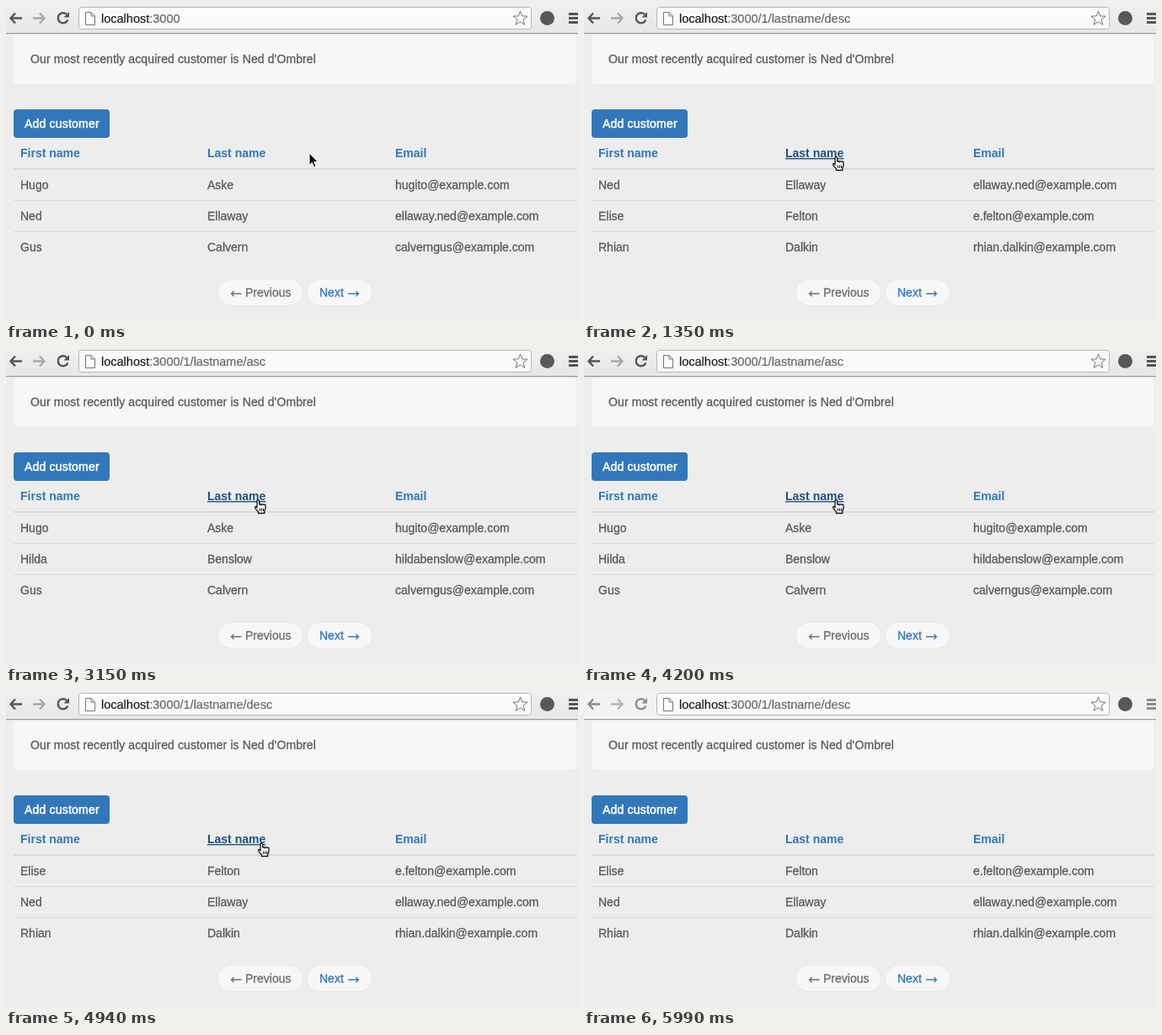
Animation, 679 px wide and 375 px high, one loop 6090 ms. Source, as an HTML page:

```html
<!DOCTYPE html>
<html lang="en">
<head>
<meta charset="utf-8">
<title>Customers</title>
<style>
  html, body { margin: 0; width: 100%; height: 100%; overflow: hidden; background: #ededed; }
  svg { display: block; }
  text {
    font: 14px "Liberation Sans", Arial, sans-serif;
    fill: #5a5a5a; stroke: #5a5a5a; stroke-width: .3px;
  }
  .link { fill: #3277b9; stroke: #3277b9; }
  .head { font-weight: bold; stroke: none; }
  .hover { fill: #23527c; text-decoration: underline 1px; text-underline-offset: 1px; }
  .url { font-size: 14.5px; fill: #666; stroke: #666; stroke-width: .2px; }
  .url .host { fill: #1c1c1c; stroke: #1c1c1c; }
  .add { fill: #fff; stroke: #fff; stroke-width: .5px; letter-spacing: .2px; }
  .muted { fill: #6c6c6c; stroke: #6c6c6c; }
  .news { letter-spacing: .11px; }
  .pill { fill: #f7f7f7; stroke: #e8e8e8; }
  .pointer { fill: none; stroke-width: 1.3px; }
  .line { fill: #dadada; }
  .icons { --ink: #555; --off: #a8a8a8; fill: none; stroke: var(--ink); stroke-width: 2.4; }
  .blur .icons { --ink: #8c8c8c; --off: #b4b4b4; }
  .blur #bar { fill: #f2f2f2; }
</style>
</head>
<body>
<svg id="stage" width="679" height="375" viewBox="0 0 679 375">
  <defs>
    <linearGradient id="chrome" x2="0" y2="1">
      <stop stop-color="#efefef"/><stop offset="1" stop-color="#e7e7e7"/>
    </linearGradient>
  </defs>

  <rect x="9.5" y="33.5" width="667" height="59" rx="4" fill="#f7f7f7" stroke="#f3f3f3"/>
  <text class="news" x="29" y="68">Our most recently acquired customer is Ned d'Ombrel</text>

  <rect id="bar" width="679" height="32" fill="url(#chrome)"/>
  <rect y="32" width="679" height="1" fill="#9c9c9c"/>
  <rect y="33" width="679" height="1" fill="#dedede"/>
  <rect x="86.5" y="1.5" width="537" height="26" rx="3" fill="#fafafa" stroke="#b6b6b6"/>
  <g class="icons">
    <path d="M19 14.5H6M11 8.5L5.5 14.5L11 20.5"/>
    <path d="M32 14.5H45M40 8.5L45.5 14.5L40 20.5" stroke="var(--off)"/>
    <path d="M72 10A6 6 0 1 0 73.3 16.5"/>
    <path d="M75 7V13.5H68.5Z" fill="var(--ink)" stroke="none"/>
    <path d="M668 9.5H679M668 14.5H679M668 19.5H679" stroke-width="3"/>
  </g>
  <path d="M94.5 7.5H101L105.5 12V22.5H94.5ZM101 7.5V12H105.5" fill="#fff" stroke="#757575"/>
  <path id="star" fill="#fbfbfb" stroke="#757575"/>
  <circle cx="642.5" cy="14.5" r="8.5" fill="#585858"/>
  <text class="url" x="113" y="20"><tspan class="host">localhost</tspan><tspan id="path"></tspan></text>

  <rect x="9" y="123" width="114" height="34" rx="4" fill="#3277b9"/>
  <text class="add" x="22" y="145">Add customer</text>

  <text class="link head" x="17" y="180">First name</text>
  <text class="link head" id="last" x="239" y="180">Last name</text>
  <text class="link head" x="462" y="180">Email</text>
  <rect class="line" x="9" y="193" width="668" height="2"/>
  <rect class="line" x="9" y="231" width="668" height="1"/>
  <rect class="line" x="9" y="268" width="668" height="1"/>
  <g id="rows"></g>

  <rect class="pill" x="251.5" y="325.5" width="101" height="31" rx="15"/>
  <rect class="pill" x="357.5" y="325.5" width="77" height="31" rx="15"/>
  <path class="muted pointer" d="M279.5 342.5H267.5M270.5 339.5L267.5 342.5L270.5 345.5"/>
  <text class="muted" x="284" y="346">Previous</text>
  <text class="link" x="372" y="346">Next</text>
  <path class="link pointer" d="M406 342.5H418.5M415.5 339.5L418.5 342.5L415.5 345.5"/>

  <path id="arrow" d="M0 0V14.5L3.3 11.5L5.7 17L8 16L5.7 10.7H10.3Z" fill="#111" stroke="#fff"/>
  <g id="hand" stroke="#111">
    <path d="M4 9.6V1.9a1.3 1.3 0 0 1 2.6 0V6.6a1.3 1.3 0 0 1 2.5 0a1.3 1.3 0 0 1 2.5 .4a1.2 1.2 0 0 1 2.4 .5V11l-1.2 3V16.5H5.5V14.8L2.2 11.2C.8 9.3 2 8 3.1 8.7Z" fill="#fff" stroke-width="1.3"/>
    <path d="M7.5 10.5V14M9.5 10.5V14M11.5 10.5V14"/>
  </g>
</svg>
<script>
const $ = id => document.getElementById(id);
const LOOP = 6090;

const people = {
  hugo: ["Hugo", "Aske", "hugito"],
  ned: ["Ned", "Ellaway", "ellaway.ned"],
  gus: ["Gus", "Calvern", "calverngus"],
  elise: ["Elise", "Felton", "e.felton"],
  rhian: ["Rhian", "Dalkin", "rhian.dalkin"],
  hilda: ["Hilda", "Benslow", "hildabenslow"]
};

const views = {
  start: [":3000", "hugo", "ned", "gus"],
  desc: [":3000/1/lastname/desc", "ned", "elise", "rhian"],
  asc: [":3000/1/lastname/asc", "hugo", "hilda", "gus"],
  desc2: [":3000/1/lastname/desc", "elise", "ned", "rhian"]
};

// Each step: start time and the properties that change there
const steps = [
  { at: 0, view: "start", cursor: "arrow", x: 360, y: 175, hover: false, blur: false },
  { at: 300, x: 332, y: 178 },
  { at: 450, cursor: "hand", x: 295, y: 179, hover: true },
  { at: 600, x: 294 },
  { at: 1350, view: "desc" },
  { at: 3150, view: "asc" },
  { at: 4340, view: "desc2" },
  { at: 4940, x: 298 },
  { at: 5090, cursor: "arrow", x: 497, y: 288 },
  { at: 5240, x: 568, y: 357 },
  { at: 5390, x: 612, y: 367 },
  { at: 5540, cursor: "none", hover: false },
  { at: 5990, blur: true }
];

const cells = [218, 255, 292].map(y => [17, 239, 462].map(x => {
  const cell = document.createElementNS("http://www.w3.org/2000/svg", "text");
  cell.setAttribute("x", x);
  cell.setAttribute("y", y);
  return $("rows").appendChild(cell);
}));

const starPoints = Array.from({ length: 10 }, (_, i) => {
  const r = i % 2 ? 3.8 : 9, a = i * Math.PI / 5;
  return (610.5 + r * Math.sin(a)).toFixed(1) + " " + (15 - r * Math.cos(a)).toFixed(1);
});
$("star").setAttribute("d", "M" + starPoints.join("L") + "Z");

function show(state) {
  const [path, ...names] = views[state.view];
  $("path").textContent = path;
  names.forEach((name, row) => {
    const [first, last, mail] = people[name];
    [first, last, mail + "@example.com"].forEach((s, col) => cells[row][col].textContent = s);
  });
  for (const id of ["arrow", "hand"]) {
    $(id).style.display = state.cursor === id ? "" : "none";
    $(id).setAttribute("transform", `translate(${state.x} ${state.y})`);
  }
  $("last").classList.toggle("hover", state.hover);
  $("stage").classList.toggle("blur", state.blur);
}

const begin = performance.now();
let shown = 0;
function tick() {
  const t = (performance.now() - begin) % LOOP;
  const past = steps.filter(step => step.at <= t);
  if (past.length !== shown) {
    shown = past.length;
    show(Object.assign({}, ...past));
  }
  requestAnimationFrame(tick);
}
tick();
</script>
</body>
</html>
```
